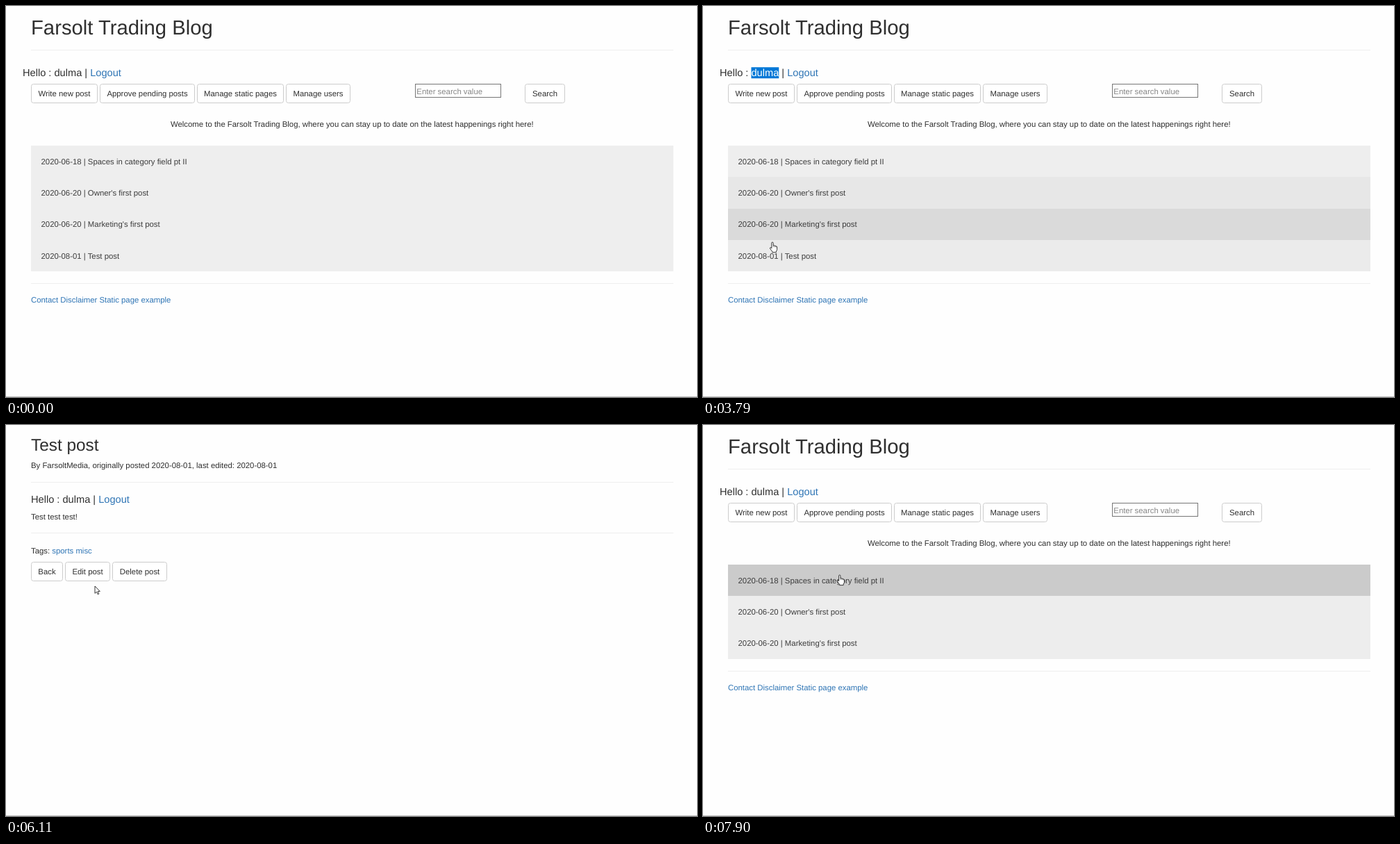
Write an HTML page with a canvas that moves like this. It is 995 px wide and 563 px high and loops after 8 s.

```html
<!DOCTYPE html>
<html lang="en">
<head>
<meta charset="utf-8">
<title>Blog</title>
<style>
html, body { margin: 0; width: 100%; height: 100%; overflow: hidden; background: #fefefe; }
canvas { display: block; }
</style>
</head>
<body>
<canvas id="stage" width="995" height="563"></canvas>
<script>
const ctx = document.getElementById('stage').getContext('2d');
const LOOP = 8000, BASE = 11.375;
const SANS = '"Liberation Sans", Arial, sans-serif';
const INK = '#2f2f2f', LINK = '#2f75b5';
const COMPANY = 'Farsolt Trading', USER = 'dulma', AUTHOR = 'FarsoltMedia';
const DRAG = 1920, DRAG_END = 2310, OPEN = 3850, TO_POST = 4780, TO_HOME = 7430;
const ROW_TOP = 201, ROW_H = 45.35;
const POSTS = [
  '2020-06-18 | Spaces in category field pt II',
  "2020-06-20 | Owner's first post",
  "2020-06-20 | Marketing's first post",
  '2020-08-01 | Test post'
];
const HOME_BUTTONS = [
  ['Write new post', 36, 112, 96], ['Approve pending posts', 135, 112, 137],
  ['Manage static pages', 275, 112, 125], ['Manage users', 403, 112, 93], ['Search', 747, 112, 58]
];
const POST_BUTTONS = [['Back', 36, 197, 46], ['Edit post', 85, 197, 65], ['Delete post', 153, 197, 79]];

// Pointer moves: start, end, number of steps, way points
const MOVES = [
  [220, 990, 11, [[730, 447], [560, 330], [330, 220], [190, 165], [115, 126], [88, 105], [81, 96]]],
  [1050, 1050, 1, [[81, 95]]],
  [1600, 1600, 1, [[74, 97]]],
  [DRAG, DRAG_END, 6, [[66, 100], [78, 97], [95, 93], [108, 88], [117, 86], [112, 89]]],
  [2770, 3540, 11, [[111, 90], [150, 220], [200, 430], [212, 515], [185, 460], [115, 370], [62, 295]]],
  [3620, 4230, 9, [[70, 278], [95, 330], [112, 362], [112, 365], [108, 400], [107, 417]]],
  [5490, 6110, 9, [[112, 412], [190, 385], [290, 350], [331, 320], [290, 270], [200, 240], [128, 232]]],
  [6250, 6490, 4, [[127, 230], [132, 226], [138, 221], [142, 219]]],
  [6690, 6720, 2, [[165, 222], [188, 221]]],
  [6890, 6890, 1, [[197, 216]]]
];

const clamp = v => Math.max(0, Math.min(1, v));

function spline(pts, u) {
  const last = pts.length - 1, f = u * last;
  const i = Math.min(Math.floor(f), Math.max(0, last - 1)), s = f - i;
  const at = k => pts[Math.max(0, Math.min(last, k))];
  const [a, b, c, d] = [at(i - 1), at(i), at(i + 1), at(i + 2)];
  return [0, 1].map(n => b[n] + s / 2 * (c[n] - a[n] +
    s * (2 * a[n] - 5 * b[n] + 4 * c[n] - d[n] + s * (3 * (b[n] - c[n]) + d[n] - a[n]))));
}

function pointer(t) {
  const move = MOVES.filter(m => t >= m[0]).pop();
  if (!move) return null;
  const [from, to, steps, pts] = move;
  if (steps === 1 || t >= to) return pts[pts.length - 1];
  const n = steps - 1;
  return spline(pts, Math.floor((t - from) / (to - from) * n) / n);
}

const onHome = t => t < TO_POST || t >= TO_HOME;
const inBox = (p, x, y, w, h) => p && p[0] >= x && p[0] <= x + w && p[1] >= y && p[1] <= y + h;
const rowY = i => Math.round(ROW_TOP + i * ROW_H);
const onRow = (p, i) => inBox(p, 36, rowY(i), 925, ROW_H - 1);
const onRead = (t, p) => t > OPEN + 200 && t < TO_POST && inBox(p, 51, 408, 70, 15);

// 400 ms colour transition, as the mean of the recent hover state
function rowShade(t, i) {
  let sum = 0;
  for (let k = 0; k < 10; k++) {
    const s = t - k * 40;
    if (onHome(s) && !(t >= TO_HOME && s < TO_HOME) && onRow(pointer(s), i)) sum++;
  }
  return sum / 10;
}

function setFont(size, family = SANS) {
  ctx.font = `${size}px ${family}`;
  ctx.textRendering = 'geometricPrecision';
}

function text(str, x, y, { size = BASE, color = INK, align = 'left', family } = {}) {
  setFont(size, family);
  ctx.textAlign = align;
  ctx.fillStyle = color;
  ctx.fillText(str, x, y);
  return ctx.measureText(str).width;
}

function rect(x, y, w, h, color) {
  ctx.fillStyle = color;
  ctx.fillRect(x, y, w, h);
}

const rule = y => rect(36, y, 925, 1, '#eee');

function button([label, x, y, w], p) {
  const hot = inBox(p, x, y, w, 27);
  ctx.beginPath();
  ctx.roundRect(x + .5, y + .5, w - 1, 27, 3);
  ctx.fillStyle = hot ? '#e6e6e6' : '#fff';
  ctx.strokeStyle = hot ? '#adadad' : '#ccc';
  ctx.lineWidth = 1;
  ctx.fill();
  ctx.stroke();
  text(label, x + w / 2, y + 17.8, { align: 'center' });
}

function greeting(x, y, t) {
  const size = 14.625;
  const start = x + text('Hello : ', x, y, { size });
  const width = text(USER, start, y, { size });
  const bar = text(' | ', start + width, y, { size });
  text('Logout', start + width + bar, y, { size, color: LINK });
  if (t < DRAG || t >= TO_POST) return;

  const edge = pointer(Math.min(t, DRAG_END))[0];
  let n = 0;
  const wide = k => ctx.measureText(USER.slice(0, k)).width;
  while (n < USER.length && start + (wide(n) + wide(n + 1)) / 2 < edge) n++;
  if (!n) return;
  rect(start, y - 13, wide(n), 16, '#0078d7');
  text(USER.slice(0, n), start, y, { size, color: '#fff' });
}

function home(t, p) {
  text(COMPANY + ' Blog', 36, 41, { size: 29.25 });
  rule(63);
  greeting(24, 101.2, t);
  HOME_BUTTONS.forEach(b => button(b, p));
  rect(589, 112, 124, 20, '#767676');
  rect(590, 113, 122, 18, '#fff');
  text('Enter search value', 591.3, 126.5, { color: '#868686' });
  text(`Welcome to the ${COMPANY} Blog, where you can stay up to date on the latest happenings right here!`,
    498.3, 173.8, { align: 'center' });

  const back = t >= TO_HOME, count = back ? 3 : 4;
  const open = back ? 0 : 1 - (1 - clamp((t - OPEN) / 200)) ** 2;
  for (let i = 0; i < count; i++) {
    const active = i === 3 && t >= OPEN;
    const grey = Math.round((back ? 237 : 238) - 34 * (active ? 1 : rowShade(t, i)));
    rect(36, rowY(i), 925, rowY(i + 1) - rowY(i), `rgb(${grey},${grey},${grey})`);
    text(POSTS[i], 50.5, ROW_TOP + i * ROW_H + 26.6, { color: '#3d3d3d' });
  }
  const end = rowY(count), grow = 41.7 * open;
  if (open) {
    ctx.save();
    ctx.beginPath();
    ctx.rect(36, end, 925, grow);
    ctx.clip();
    text('<p>Test test test!</p>', 51.2, 395);
    const hot = onRead(t, p), color = hot ? '#23527c' : LINK;
    const w = text('Read full post', 51.2, 419.5, { color });
    if (hot) rect(51.2, 421, w, 1, color);
    ctx.restore();
  }
  rule(Math.round(end + 16.7 + grow));
  text('Contact Disclaimer Static page example', 36, end + 45.2 + grow, { color: LINK });
}

function post(t, p) {
  text('Test post', 36, 37.4, { size: 24.375 });
  text(`By ${AUTHOR}, originally posted 2020-08-01, last edited: 2020-08-01`, 36, 61.7);
  rule(82);
  greeting(36, 112.2, t);
  text('Test test test!', 36, 135.5);
  rule(155);
  const w = text('Tags: ', 36, 185);
  text('sports misc', 36 + w, 185, { color: LINK });
  POST_BUTTONS.forEach(b => button(b, p));
}

function statusBar(t) {
  const reading = t >= 4320 && t < TO_POST;
  const leaving = t >= 7270 && t < TO_HOME;
  if (reading || leaving) {
    const w = reading ? 177 : 90;
    rect(0, 548, w, 15, '#dcdcdc');
    rect(0, 549, w - 1, 14, '#f7f7f7');
    if (reading && t >= 4400) {
      ctx.globalAlpha = t < 4490 ? .6 : 1;
      text('SBlog/displayHomePostView?postId=14', -.8, 561.6,
        { size: 9.5, color: '#505050', family: '"Open Sans", "Noto Sans", sans-serif' });
      ctx.globalAlpha = 1;
    }
  }
  rect(0, 562, 995, 1, '#c4c4c4');
}

const ARROW = new Path2D('M0 0V10.4L2.5 8.2L4.2 11.9L5.8 11.2L4.2 7.6H7.3Z');
const HAND = new Path2D('M-1.4 9V1Q-1.3 0 -.3 0Q.8 0 .9 1V4.6Q2.3 4.1 2.9 5.2Q4.3 4.8 4.8 5.9' +
  'Q6.3 5.7 6.4 7V10.4Q6.3 12 5.2 13V14.6H-.4V13.4L-3.7 9.2Q-4.1 7.8 -3 7.7Q-2.2 7.9 -1.4 9Z');
const KNUCKLES = new Path2D('M.9 4.6V7M2.9 5.2V7.2M4.8 5.9V7.4');
const BEAM = new Path2D('M-2.5 -5.5H-.7L0 -5L.7 -5.5H2.5M0 -5V5M-2.5 5.5H-.7L0 5L.7 5.5H2.5');

function cursor(t, p) {
  const atHome = onHome(t), buttons = atHome ? HOME_BUTTONS : POST_BUTTONS;
  const hand = buttons.some(b => inBox(p, b[1], b[2], b[3], 27)) || onRead(t, p) ||
    (atHome && POSTS.some((_, i) => onRow(p, i)));
  const beam = atHome && (inBox(p, 24, 84, 142, 22) || inBox(p, 238, 163, 520, 14));
  const shape = hand ? HAND : beam ? BEAM : ARROW;
  ctx.save();
  ctx.translate(p[0], p[1]);
  ctx.lineWidth = .9;
  ctx.strokeStyle = '#222';
  ctx.fillStyle = '#fff';
  if (shape !== BEAM) ctx.fill(shape);
  ctx.stroke(shape);
  if (hand) {
    ctx.lineWidth = .6;
    ctx.stroke(KNUCKLES);
  }
  ctx.restore();
}

function draw(t) {
  const p = pointer(t);
  rect(0, 0, 995, 563, '#fefefe');
  (onHome(t) ? home : post)(t, p);
  statusBar(t);
  if (p) cursor(t, p);
}

const begin = performance.now();
function tick() {
  draw((performance.now() - begin) % LOOP);
  requestAnimationFrame(tick);
}
tick();
</script>
</body>
</html>
```
